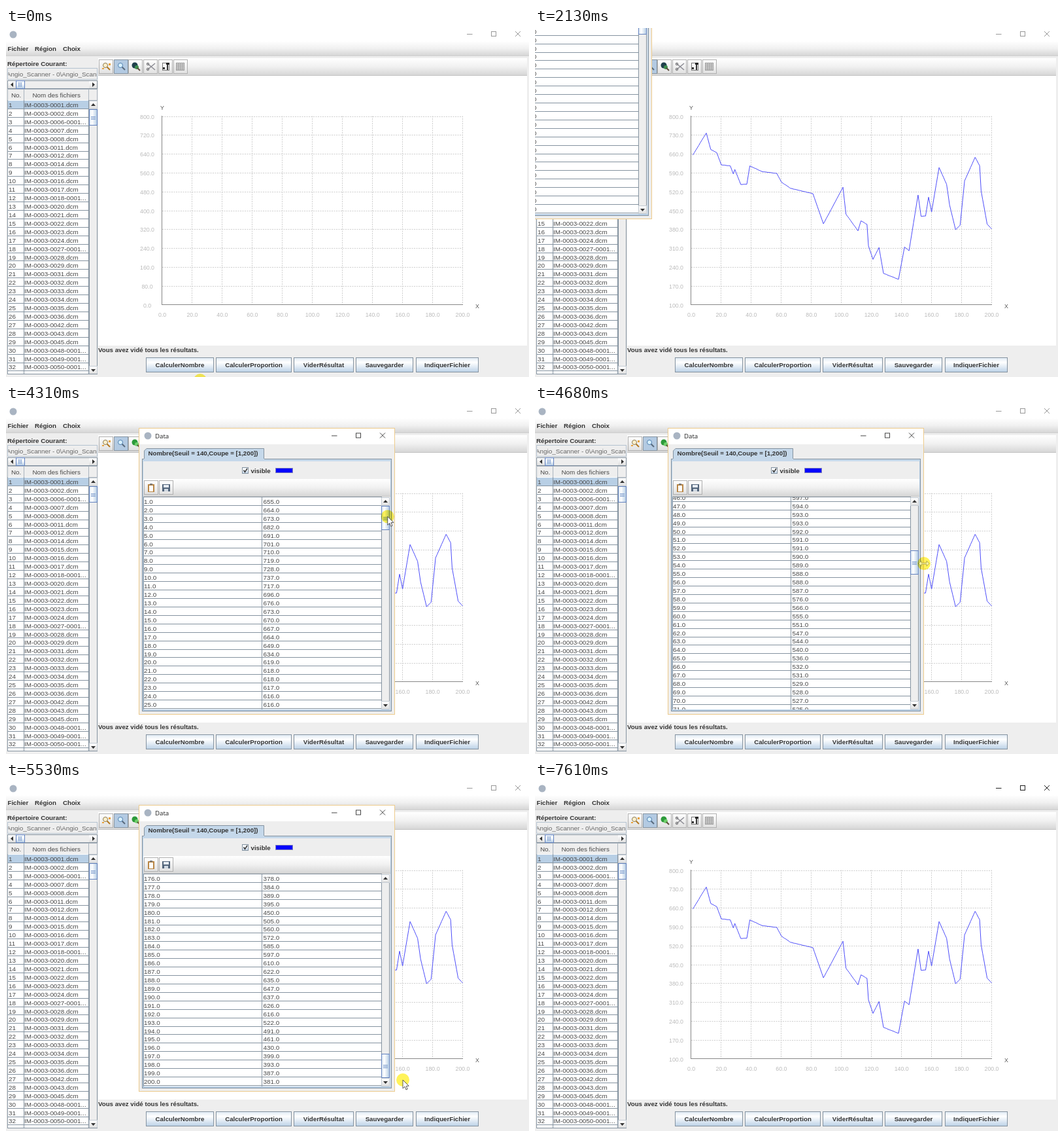
An HTML page with a canvas that plays this animation: 800x533 px, repeating every 8 s.

```html
<!DOCTYPE html>
<html lang="fr">
<head>
<meta charset="utf-8">
<title>Nombre par coupe</title>
<style>
html, body { margin: 0; width: 100%; height: 100%; overflow: hidden; background: #eee; }
canvas { display: block; width: 800px; height: 533px; }
</style>
</head>
<body>
<canvas id="stage" width="800" height="533"></canvas>
<script>
const ctx = document.getElementById('stage').getContext('2d');
const LOOP = 8000, STEP = 1000 / 13, PHASE = 62, ROW = 12.92;
const SANS = '"Liberation Sans", Arial, sans-serif';
const PLAIN = '9.85px ' + SANS, BOLD = 'bold 9.7px ' + SANS, SMALL = '8.8px ' + SANS;
const EDGE = '#8593a0', BLUE = '#b8cfe5', INK = '#333', SOFT = '#484848', PALE = '#bbb';

// Moments at which the picture changes abruptly, and the span of the scroll drag.
const AT = {
  press: 620, plot: 720, open: 1790, drag: 2750, drop: 3590,
  grab: 4450, release: 5450, hover: 6330, close: 6900, shut: 7130
};

// time, x, y of the pointer tip
const pointerPath = [
  [70, 297, 538], [420, 270, 516], [930, 268, 514], [1580, 266, 58], [1830, 266, 58],
  [2110, -49, -138], [AT.drag, -49, -138], [3400, 367, 43], [3600, 367, 43],
  [4370, 590, 174], [AT.grab, 590, 174], [4677, 595, 242], [5139, 593, 386], [AT.release, 607, 455],
  [5780, 607, 455], [6080, 590, 146], [6400, 573, 42], [7300, 573, 42], [7590, 742, 552]
];

// Turning points of the curve: slice, count
const turns = [
  [1, 655], [10, 737], [13, 676], [17, 664], [20, 619], [26, 615], [28, 585], [29, 602], [33, 546],
  [37, 547], [39, 615], [47, 594], [57, 587], [60, 555], [66, 532], [81, 512], [88, 400], [94, 462],
  [101, 536], [103, 436], [111, 374], [113, 411], [117, 398], [118, 318], [121, 268], [125, 312],
  [128, 216], [138, 194], [142, 314], [145, 300], [151, 507], [153, 428], [156, 429], [158, 499],
  [160, 444], [165, 609], [170, 547], [172, 470], [176, 378], [179, 395], [182, 560], [189, 647],
  [192, 616], [193, 522], [197, 399], [200, 381]
];

const linear = u => u;
const smooth = u => u * u * (3 - 2 * u);
const clamp = (v, low, high) => Math.min(Math.max(v, low), high);
function follow(path, t, ease = linear) {
  if (t <= path[0][0]) return path[0].slice(1);
  const i = path.findIndex(p => p[0] > t);
  if (i < 0) return path[path.length - 1].slice(1);
  const a = path[i - 1], b = path[i], u = ease((t - a[0]) / (b[0] - a[0]));
  return a.slice(1).map((v, k) => v + (b[k + 1] - v) * u);
}

const values = Array.from({ length: 200 }, (_, i) => Math.round(follow(turns, i + 1)[0]));

const files = [];
for (const run of '1-2 6-8 11-12 14-18 20-24 27-29 31-36 42-43 45-45 48-50 52-52'.split(' ')) {
  const [first, last] = run.split('-').map(Number);
  for (let n = first; n <= last; n++) {
    const split = n >= 48 || [6, 18, 27].includes(n);
    files.push('IM-0003-' + String(n).padStart(4, '0') + (split ? '-0001...' : '.dcm'));
  }
}

function box(x, y, w, h, fill) { ctx.fillStyle = fill; ctx.fillRect(x, y, w, h); }
function frame(x, y, w, h, color = EDGE, size = 1) {
  ctx.strokeStyle = color; ctx.lineWidth = size;
  ctx.strokeRect(x + size / 2, y + size / 2, w - size, h - size);
}
function shade(x, y, w, h, colors, across) {
  const g = across ? ctx.createLinearGradient(x, 0, x + w, 0) : ctx.createLinearGradient(0, y, 0, y + h);
  colors.forEach((c, i) => g.addColorStop(i / (colors.length - 1), c));
  box(x, y, w, h, g);
}
const bar = (x, y, w, h) => shade(x, y, w, h, ['#fff', '#f1f1f1', '#d6d6d6']);
const knob = (x, y, w, h) => shade(x, y, w, h, ['#fff', '#e0e0e0']);
const ocean = (x, y, w, h, across) => shade(x, y, w, h, ['#dde8f3', '#fff', '#dde8f3', BLUE], across);
function text(s, x, y, font = PLAIN, color = INK, align = 'left') {
  ctx.font = font; ctx.fillStyle = color; ctx.textAlign = align;
  ctx.fillText(s, x, y + 3.5);
}
function line(points, color, width = 1) {
  ctx.strokeStyle = color; ctx.lineWidth = width;
  ctx.beginPath(); points.forEach(p => ctx.lineTo(...p)); ctx.stroke();
}
function shape(points, fill) {
  ctx.fillStyle = fill;
  ctx.beginPath(); points.forEach(p => ctx.lineTo(...p)); ctx.closePath(); ctx.fill();
}
function disc(x, y, r, fill, edge) {
  ctx.beginPath(); ctx.arc(x, y, r, 0, 7);
  if (fill) { ctx.fillStyle = fill; ctx.fill(); }
  if (edge) { ctx.strokeStyle = edge; ctx.lineWidth = 1; ctx.stroke(); }
}
function clipped(x, y, w, h, draw) {
  ctx.save(); ctx.beginPath(); ctx.rect(x, y, w, h); ctx.clip(); draw(); ctx.restore();
}

function windowButtons(x, y, color, cross = color) {
  line([[x - 4, y + .5], [x + 4.5, y + .5]], color);
  frame(x + 33, y - 4, 8, 8, color);
  line([[x + 70, y - 4], [x + 78, y + 4]], cross);
  line([[x + 70, y + 4], [x + 78, y - 4]], cross);
}

function verticalBar(x, y, h, thumb, thumbHeight) {
  box(x, y, 13, h, '#eee'); frame(x, y, 13, h);
  [[y, -1], [y + h - 13, 1]].forEach(([top, dir]) => {
    knob(x + 1, top + 1, 11, 11);
    frame(x, top, 13, 13, '#c3cbd3');
    const c = top + 6.5;
    shape([[x + 3, c - 1.5 * dir], [x + 10, c - 1.5 * dir], [x + 6.5, c + 2.5 * dir]], INK);
  });
  ocean(x + 1, thumb, 11, thumbHeight, true);
  frame(x, thumb, 13, thumbHeight, '#6382bf');
  for (const d of [-2, 0, 2]) box(x + 3, Math.round(thumb + thumbHeight / 2 + d), 7, 1, '#7f9fcf');
}

function toolButton(x, y, on) {
  on ? box(x, y, 22, 22, '#b3cae2') : knob(x, y, 22, 22);
  frame(x, y, 22, 22, on ? EDGE : '#b0b0b0');
}
function lens(x, y, fill, rim, handle) {
  line([[x + 2, y + 2], [x + 7, y + 7]], handle, 2);
  disc(x, y, 3.5, fill, rim);
}

function toolbar(t) {
  bar(141, 46, 656, 26); box(141, 72, 656, 1, '#c4c4c4');
  for (let i = 0; i < 6; i++) toolButton(Math.round(142 + i * 22.7), 48, i === 1);
  lens(152, 57, '#fff0cc', '#8a7a50', '#b5791f');
  box(157, 54, 3, 3, '#e9a23b'); box(147, 61, 3, 2, '#e9a23b');
  lens(175, 57, '#d9f1ff', '#4f7fae', '#596a7c');
  const vivid = t > AT.drop;
  disc(197, 57, 4.5, vivid ? '#2c9a3a' : '#20414c');
  disc(200, 60, 3, vivid ? '#6fcf6a' : '#3f8f4f');
  line([[201, 61], [205, 65]], '#5b4a38', 2);
  line([[216, 54], [228, 64]], '#8b8b93', 1.5); line([[216, 64], [228, 54]], '#8b8b93', 1.5);
  disc(217, 63, 1.8, null, '#777'); disc(217, 55, 1.8, null, '#777');
  box(239, 53, 11, 12, '#f8f8f8'); frame(239, 53, 11, 12, '#777');
  box(245, 53, 5, 3, '#222'); box(246, 56, 2, 8, '#333'); box(240, 60, 3, 3, '#333');
  box(260, 53, 13, 12, '#d4d4d4'); frame(260, 53, 13, 12, '#999');
  for (const d of [3, 6, 9]) { box(260, 53 + d, 13, 1, '#a3a3a3'); box(260 + d, 53, 1, 12, '#a3a3a3'); }
}

function fileList() {
  text('Répertoire Courant:', 2, 54, BOLD);
  frame(2, 61, 138, 18, '#b4c2cf');
  clipped(3, 62, 136, 16, () => text('Angio_Scanner - 0\\Angio_Scanner', 1, 70, PLAIN, '#666'));
  frame(2, 80, 138, 13);
  knob(3, 81, 12, 11); knob(127, 81, 12, 11);
  shape([[11, 83], [11, 90], [7, 86.5]], INK); shape([[132, 83], [132, 90], [136, 86.5]], INK);
  ocean(15, 81, 14, 11); frame(15, 80, 14, 13, '#6382bf');
  for (const x of [19, 21, 23]) box(x, 83, 1, 7, '#7f9fcf');

  frame(2, 93, 138, 18, '#aab4be');
  box(27, 94, 1, 16, '#aab4be'); box(126, 94, 1, 16, '#aab4be');
  text('No.', 8, 102, PLAIN, SOFT); text('Nom des fichiers', 40.5, 102, PLAIN, SOFT);
  clipped(2, 110, 125, 419, () => {
    box(2, 110, 125, 419, '#fff');
    files.forEach((name, i) => {
      const y = 111 + i * ROW;
      if (!i) box(2, 111, 125, 12, BLUE);
      text(i + 1, 4, y + ROW / 2, PLAIN, SOFT); text(name, 28, y + ROW / 2, PLAIN, SOFT);
      box(2, Math.round(y + ROW) - 1, 125, 1, EDGE);
    });
    for (const x of [2, 27, 126]) box(x, 110, 1, 419, EDGE);
  });
  verticalBar(127, 111, 418, 124, 25);
  box(2, 528, 138, 1, EDGE);
}

function chart(plotted) {
  const left = 239, top = 134.5, right = 698.5, bottom = 422.5, dx = 45.95, dy = 28.8;
  const low = plotted ? 100 : 0, step = plotted ? 70 : 80;
  box(141, 73, 656, 412, '#fff');
  for (let i = 0; i <= 10; i++) {
    const x = left + i * dx, y = bottom - i * dy;
    if (i) {
      const gx = Math.round(x) - .5, gy = Math.round(y) + .5;
      ctx.setLineDash([2, 1.5]);
      line([[gx, top], [gx, bottom]], '#cecece');
      line([[left, gy], [right, gy]], '#cecece');
      ctx.setLineDash([]);
    }
    text((i * 20).toFixed(1), x, 437, SMALL, PALE, 'center');
    text((low + i * step).toFixed(1), 216, y + .5, SMALL, PALE, 'center');
  }
  box(238, 134, 1, 289, '#888'); box(238, 422, 461, 1, '#888');
  text('Y', 239, 121, SMALL, '#555', 'center');
  text('X', 721, 424, SMALL, '#555', 'center');
  if (plotted) line(values.map((v, i) =>
    [left + (i + 1) * dx / 20, bottom - (v - low) * dy / step]), '#4d4dfa');
}

function buttons(t) {
  const list = [['CalculerNombre', 214, 104], ['CalculerProportion', 321, 116], ['ViderRésultat', 440, 92],
    ['Sauvegarder', 535, 88], ['IndiquerFichier', 627, 96]];
  list.forEach(([label, x, w], i) => {
    const pressed = !i && t >= AT.press && t < AT.plot;
    pressed ? box(x, 503, w, 23, BLUE) : ocean(x, 503, w, 23);
    frame(x, 503, w, 23);
    if (!i && t >= AT.press && t < AT.open) frame(x + 11, 506, w - 22, 17, '#a3b8cc');
    text(label, x + w / 2, 514, BOLD, INK, 'center');
  });
}

function mainWindow(t) {
  const active = t >= AT.press && t < AT.open || t >= AT.shut;
  box(0, 0, 800, 533, '#eee');
  box(0, 0, 800, 20, '#fff');
  disc(11, 10, 5.5, '#a9b4c2');
  windowButtons(709, 9, active ? '#222' : '#999');
  bar(0, 20, 800, 22); box(0, 42, 800, 1, '#cfcfcf');
  text('Fichier', 2.5, 31, BOLD); text('Région', 44, 31, BOLD); text('Choix', 87, 31, BOLD);
  toolbar(t);
  chart(t >= AT.plot);
  fileList();
  text('Vous avez vidé tous les résultats.', 141, 491.5, BOLD);
  buttons(t);
}

function dataTable(t) {
  const grip = follow(pointerPath, clamp(t, AT.grab, AT.release))[1];
  const limit = 175 * ROW, scrolled = clamp((grip - 174) * 8.625, 0, limit);
  clipped(210, 140, 365, 325, () => {
    box(210, 140, 365, 325, '#fff');
    const first = Math.floor(scrolled / ROW);
    for (let i = first; i < Math.min(first + 27, values.length); i++) {
      const y = 141 + i * ROW - scrolled;
      text((i + 1).toFixed(1), 211, y + ROW / 2, PLAIN, SOFT);
      text(values[i].toFixed(1), 393.5, y + ROW / 2, PLAIN, SOFT);
      box(210, Math.round(y + ROW) - 1, 365, 1, EDGE);
    }
    box(210, 140, 365, 1, EDGE);
    for (const x of [210, 391, 574]) box(x, 140, 1, 325, EDGE);
  });
  verticalBar(574, 141, 324, Math.round(154 + 261 * scrolled / limit), 37);
}

function dataWindow(t) {
  ctx.save();
  if (t < AT.drop) ctx.translate(-416, -181);
  box(203, 35, 392, 438, '#eee');
  box(204, 36, 390, 24, '#fff');
  disc(217, 47, 5.5, '#a9b4c2');
  text('Data', 228, 47.5, '9.7px "Open Sans", sans-serif', '#222');
  const hot = t >= AT.hover;
  if (hot) box(558, 35, 37, 24, t >= AT.close ? '#f1707a' : '#e81123');
  windowButtons(502, 46.5, '#444', hot ? '#fff' : '#444');
  frame(203, 35, 392, 438, '#edcb8c');

  box(208, 82, 382, 386, '#eee'); frame(208, 82, 382, 386, EDGE);
  box(209, 83, 380, 3, '#c5d8ea');
  box(209, 86, 1, 381, BLUE); box(588, 86, 1, 381, BLUE); box(209, 465, 380, 2, BLUE);
  shape([[211, 84], [211, 70], [215, 66], [395, 66], [395, 84]], '#c5d8ea');
  line([[211.5, 82], [211.5, 70], [215, 66.5], [394.5, 66.5], [394.5, 82]], EDGE);
  text('Nombre(Seuil = 140,Coupe = [1,200])', 217.5, 73.5, BOLD);

  ocean(361, 95, 10, 10); frame(361, 95, 10, 10);
  line([[363.5, 99.5], [365.5, 102.5], [369, 97]], INK, 1.5);
  text('visible', 374.5, 100, BOLD);
  box(412, 96, 27, 8, '#00f'); frame(412, 96, 27, 8, '#8888bb');

  bar(210, 113, 378, 26); box(210, 139, 378, 1, '#c8c8c8');
  toolButton(211, 115); toolButton(234, 115);
  box(217, 121, 10, 12, '#b98645'); box(219, 123, 6, 9, '#fff'); box(220, 120, 4, 2, '#777');
  box(239, 121, 12, 11, '#53657b'); box(241, 122, 8, 4, '#e8eef5'); box(242, 128, 6, 4, '#cfd8e2');
  dataTable(t);
  ctx.restore();
}

function pointer(t, x, y) {
  ctx.save();
  ctx.globalCompositeOperation = 'multiply';
  disc(x, y, 10, '#fff35a');
  ctx.restore();
  const resizing = t > 4560 && t < 4900;
  const half = [[-8, 0], [-4, -4], [-4, -1], [4, -1], [4, -4], [8, 0]];
  const outline = resizing
    ? [...half, ...half.slice(1, 5).reverse().map(([dx, dy]) => [dx, -dy])]
    : [[0, 0], [0, 13], [3, 10.2], [5, 15], [7.2, 14], [5.2, 9.4], [9.2, 9.2]];
  const points = outline.map(([dx, dy]) => [x + dx, y + dy]);
  shape(points, resizing ? '#fff9a8' : '#fff');
  line([...points, points[0]], resizing ? '#a39a3c' : '#333', .8);
}

function draw(t) {
  const scrolling = t > AT.grab && t < AT.release;
  const [x, y] = follow(pointerPath, t, scrolling ? linear : smooth);
  mainWindow(t);
  if (t >= AT.open && t < AT.shut) dataWindow(t);
  if (t >= AT.drag && t < AT.drop) frame(Math.round(x - 169), Math.round(y - 8), 403, 444, '#000', 3);
  pointer(t, x, y);
}

// The picture advances thirteen times a second.
const hold = t => PHASE + Math.floor((t - PHASE) / STEP) * STEP;
const start = performance.now();
function tick() {
  draw(hold((performance.now() - start) % LOOP));
  requestAnimationFrame(tick);
}
tick();
</script>
</body>
</html>
```
